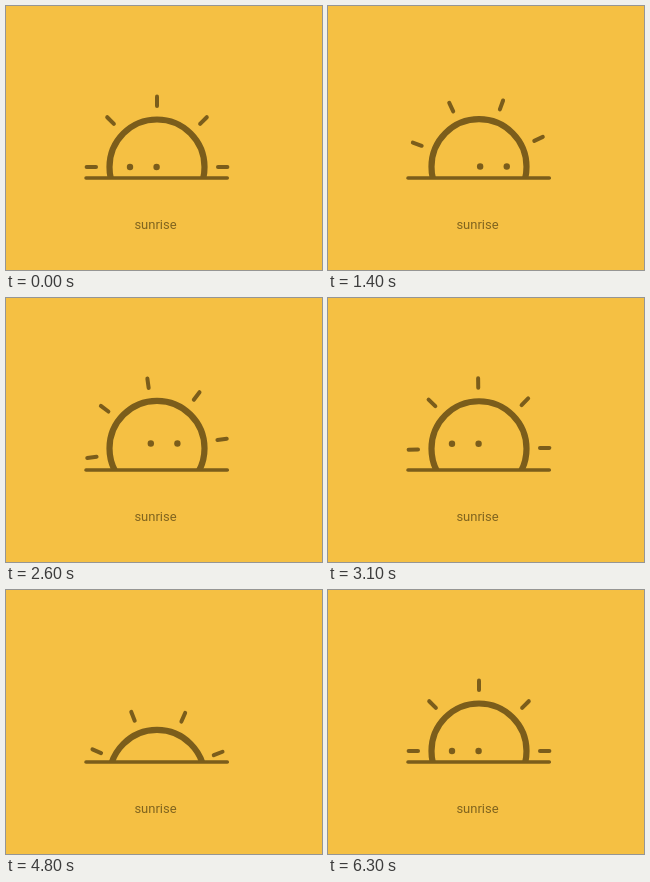
These frames come from a looping animation (316 by 264 pixels, 6400 ms). An HTML page:

```html
<!DOCTYPE html>
<html lang="en">
<head>
<meta charset="utf-8">
<title>sunrise</title>
<style>
  html, body { margin: 0; width: 100%; height: 100%; overflow: hidden; background: #f5c043; }
  svg { display: block; width: 100vw; height: 100vh; }
  text { font: 400 13px Roboto, sans-serif; fill: #80641f; text-anchor: middle; }
  .ink { stroke: #7b5d1b; fill: none; stroke-linecap: round; }
</style>
</head>
<body>
<svg viewBox="0 0 316 264">
  <defs>
    <clipPath id="sky"><rect width="316" height="172"/></clipPath>
  </defs>
  <rect width="316" height="264" fill="#f5c043"/>
  <g clip-path="url(#sky)">
    <g id="sun">
      <circle class="ink" r="47.5" stroke-width="6.2"/>
      <g id="rays" class="ink" stroke-width="4"></g>
    </g>
    <g id="eyes" fill="#7b5d1b">
      <circle r="3.2"/>
      <circle r="3.2" cx="26.6"/>
    </g>
  </g>
  <path class="ink" d="M80 172H221.3" stroke-width="3.5"/>
  <text x="149.5" y="222.5">sunrise</text>
</svg>
<script>
  const LOOP = 6400, STEP = 100, CX = 151;
  const $ = id => document.getElementById(id);
  const sun = $('sun'), rays = $('rays'), eyes = $('eyes');

  for (let a = 0; a < 360; a += 45) {
    const ray = document.createElementNS('http://www.w3.org/2000/svg', 'path');
    ray.setAttribute('d', 'M0-61V-70.4');
    ray.setAttribute('transform', `rotate(${a})`);
    rays.append(ray);
  }

  const linear = u => u;
  const quad = u => u < 0.5 ? 2 * u * u : 1 - 2 * (1 - u) ** 2;
  const cubic = u => u < 0.5 ? 4 * u ** 3 : 1 - 4 * (1 - u) ** 3;

  // Eased progress from 0 to 1 between two times
  const ramp = (t, from, to, ease) =>
    ease(Math.min(1, Math.max(0, (t - from) / (to - from))));

  function draw(t) {
    const peek = ramp(t, 1200, 2800, quad);
    const y = 161 - 11 * peek
      + 41.5 * ramp(t, 3000, 3600, cubic)
      - 5.5 * ramp(t, 3700, 5200, linear)
      - 25 * ramp(t, 5450, 6200, cubic);
    const look = ramp(t, 1000, 1500, quad) - ramp(t, 2400, 2900, quad);
    const lift = 5 * peek * (t < 4200);

    sun.setAttribute('transform', `translate(${CX} ${y})`);
    rays.setAttribute('transform', `rotate(${t * 90 / (LOOP - STEP)})`);
    eyes.setAttribute('transform', `translate(${124 + 30.6 * look} ${y - lift})`);
  }

  function tick() {
    const t = performance.now() % LOOP;
    draw(Math.floor(t / STEP) * STEP);
    requestAnimationFrame(tick);
  }
  tick();
</script>
</body>
</html>
```
